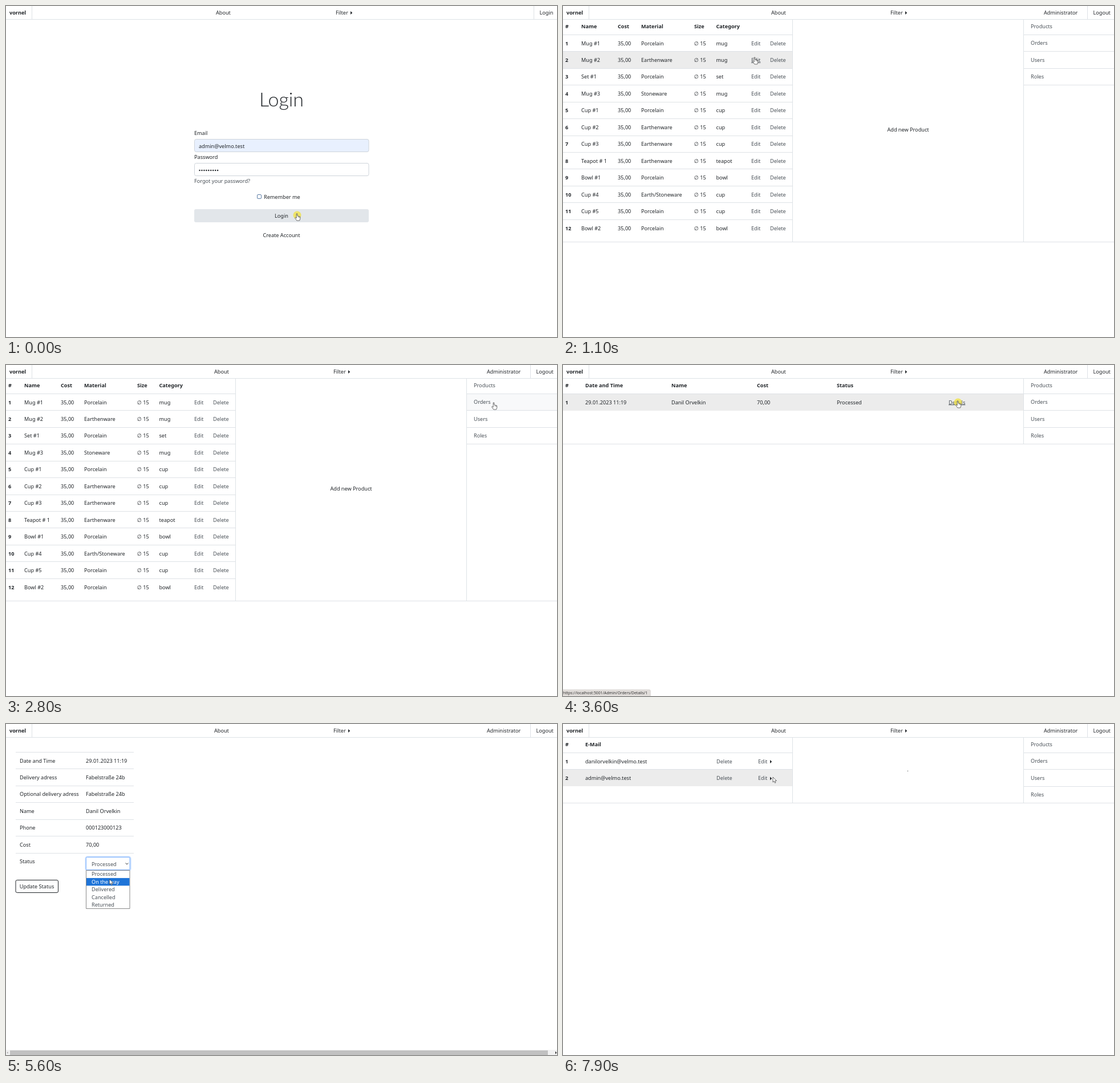
Recreate the animation shown at these times as an HTML page with a canvas. Size 966x580 px, loop 8000 ms.

```html
<!DOCTYPE html>
<html lang="en">
<head>
<meta charset="utf-8">
<title>Ceramics shop admin</title>
<style>
  html, body { margin: 0; width: 100%; height: 100%; overflow: hidden; background: #fff; }
  canvas { display: block; }
</style>
</head>
<body>
<canvas id="stage" width="966" height="580"></canvas>
<script>
const c = document.getElementById('stage').getContext('2d');
const LOOP = 8000, TICK = 100, ROW = 29.45;
const INK = '#212529', LINE = '#dee2e6', SOFT = '#495057';
const ORDERED = '29.01.2023 11:19', BUYER = 'Danil Orvelkin', STREET = 'Fabelstraße 24b';

// time, x, y, pointer kind
const POINTER = [
  [0, 510, 364, 'hand'], [99, 510, 364, 'hand'], [100, 872, 15, 'arrow'], [200, 872, 15, 'arrow'],
  [400, 863, 12, 'arrow'], [500, 863, 12, 'arrow'], [600, 600, 45, 'arrow'], [700, 342, 62, 'hand'],
  [1000, 342, 62, 'hand'], [1100, 336, 90, 'hand'], [1300, 372, 94, 'hand'], [1500, 374, 122, 'hand'],
  [1600, 374, 122, 'hand'], [2000, 600, 160, 'arrow'], [2300, 780, 60, 'arrow'], [2500, 846, 34, 'hand'],
  [2800, 855, 66, 'hand'], [3100, 855, 66, 'arrow'], [3400, 692, 63, 'hand'], [4100, 692, 63, 'arrow'],
  [4400, 201, 154, 'beam'], [4600, 201, 154, 'beam'], [4900, 190, 243, 'arrow'], [5200, 188, 246, 'arrow'],
  [5500, 182, 262, 'arrow'], [5800, 180, 292, 'arrow'], [6000, 178, 274, 'arrow'], [6300, 178, 274, 'arrow'],
  [6600, 67, 293, 'hand'], [6800, 62, 287, 'hand'], [6900, 62, 287, 'arrow'], [7200, 836, 76, 'hand'],
  [7300, 840, 88, 'hand'], [7400, 840, 92, 'hand'], [7600, 840, 92, 'arrow'], [7900, 368, 93, 'arrow']
];
const PAGES = [[0, loginPage], [100, shopPage], [600, productsPage], [3100, ordersPage],
               [3700, detailsPage], [6900, ordersPage], [7600, usersPage]];
const LINKS = [[100, 600, 'Home/Products'], [1200, 1700, 'Products/Edit/2'], [2900, 3200, 'Home/Orders'],
               [3500, 4200, 'Orders/Details/1'], [7300, 7700, 'Home/Users']];
const CLICKS = [0, 3000, 3600, 5000, 6800];

let now = 0, pointer;

function text(s, x, y, { size = 9.15, weight = 400, align = 'left', color = INK, font = 'Noto Sans' } = {}) {
  c.font = `${weight} ${size}px "${font}", "Open Sans", "DejaVu Sans", sans-serif`;
  c.textAlign = align;
  c.fillStyle = color;
  c.fillText(s, x, y + size * 0.36);
}
const bold = (s, x, y) => text(s, x, y, { weight: 700 });
const centered = (s, x, y) => text(s, x, y, { align: 'center' });

function rect(x, y, w, h, color) {
  c.fillStyle = color;
  c.fillRect(x, y, w, h);
}
const across = (x0, x1, y) => rect(x0, Math.round(y), x1 - x0, 1, LINE);
const down = (x, y0, y1) => rect(x, y0, 1, y1 - y0, LINE);

function box(x, y, w, h, fill, stroke, radius = 3, width = 1) {
  c.beginPath();
  c.roundRect(x, y, w, h, radius);
  if (fill) { c.fillStyle = fill; c.fill(); }
  if (stroke) { c.strokeStyle = stroke; c.lineWidth = width; c.stroke(); }
}

function shape(points, fill, stroke, width = 0.8) {
  c.beginPath();
  points.forEach(([x, y]) => c.lineTo(x, y));
  c.closePath();
  if (fill) { c.fillStyle = fill; c.fill(); }
  if (stroke) { c.strokeStyle = stroke; c.lineWidth = width; c.stroke(); }
}
const caret = (x, y) => shape([[x, y - 3], [x + 3.2, y], [x, y + 3]], INK);

function header(about, filter, divider, right = 966, admin = 0, last = 'Logout') {
  across(0, right, 23);
  down(45, 0, 23);
  down(divider, 0, 23);
  bold('vornel', 6, 11.5);
  text('About', about, 11.5);
  text('Filter', filter, 11.5);
  caret(filter + 26, 12);
  if (admin) text('Administrator', admin, 11.5, { color: now >= 400 && now < 600 ? SOFT : INK });
  text(last, divider + 10.5, 11.5);
}
const adminHeader = () => header(365, 574, 919, 966, 843);

function loginPage() {
  header(368, 578, 925, 966, 0, 'Login');
  text('Login', 483, 164, { size: 34, weight: 300, align: 'center', font: 'Lato' });
  text('Email', 330, 223);
  box(330.5, 233.5, 305.5, 22, '#e8f0fe', '#ced4da');
  text('admin@velmo.test', 338, 245.5);
  text('Password', 330, 264.5);
  box(330.5, 275.5, 305.5, 22, '#fff', '#ced4da');
  for (let i = 0; i < 9; i++) box(338.3 + i * 3.95, 286.8, 2.4, 2.4, INK, null, 1.2);
  text('Forgot your password?', 330, 306.5, { color: SOFT });
  box(440.5, 330.5, 7, 7, '#fff', '#5d7ea8', 1.5);
  text('Remember me', 452, 335);
  box(330, 356, 306, 23, '#e2e6ea');
  centered('Login', 483, 368);
  centered('Create Account', 483, 401.5);
}

function sideways(x0, x1, tones) {
  const gradient = c.createLinearGradient(x0, 0, x1, 0);
  tones.forEach((tone, i) => gradient.addColorStop(i / (tones.length - 1), tone));
  return gradient;
}

function oval(x, y, rx, ry, fill) {
  c.beginPath();
  c.ellipse(x, y, rx, ry, 0, 0, 7);
  c.fillStyle = fill;
  c.fill();
}

const cubic = (a, b, d, e, t) =>
  a * (1 - t) ** 3 + 3 * b * t * (1 - t) ** 2 + 3 * d * t * t * (1 - t) + e * t ** 3;

// Pottery: rim [left, right, y, depth], foot [left, right, y], tones across the wall, round = foot corner
function pot({ rim: [l, r, y, d], foot: [fl, fr, fy], tones, inside, lip, speck, count, handle, bands = [], round = 14, seed }) {
  const mid = (l + r) / 2, half = (r - l) / 2;
  const random = () => (seed = (seed * 16807) % 2147483647) / 2147483647;
  const speckle = (x, sy) => {
    c.globalAlpha = 0.35 + random() * 0.6;
    oval(x, sy, 0.4 + random() ** 4 * 1.5, 0.4 + random() ** 4 * 1.5, speck);
    c.globalAlpha = 1;
  };
  if (handle) {
    const [x0, y0, ax, ay, bx, by, x1, y1, width] = handle;
    c.beginPath();
    c.moveTo(x0, y0);
    c.bezierCurveTo(ax, ay, bx, by, x1, y1);
    c.strokeStyle = tones[2];
    c.lineWidth = width;
    c.stroke();
    for (let i = 0; i < count / 8; i++) {
      const t = random(), spread = (random() - 0.5) * width * 0.8;
      speckle(cubic(x0, ax, bx, x1, t) + spread, cubic(y0, ay, by, y1, t) + spread * 0.3);
    }
  }
  c.save();
  c.beginPath();
  c.moveTo(l, y);
  c.lineTo(fl, fy - round);
  c.quadraticCurveTo(fl + 2, fy - 4, fl + round * 1.3, fy - 3);
  c.quadraticCurveTo(mid, fy + 3, fr - round * 1.3, fy - 3);
  c.quadraticCurveTo(fr - 2, fy - 4, fr, fy - round);
  c.lineTo(r, y);
  c.ellipse(mid, y, half, d, 0, 0, Math.PI, true);
  c.fillStyle = sideways(l, r, tones);
  c.fill();
  c.clip();
  const shade = c.createLinearGradient(0, fy - 16, 0, fy);
  shade.addColorStop(0, 'rgba(60,40,25,0)');
  shade.addColorStop(1, 'rgba(60,40,25,.22)');
  rect(l, fy - 16, r - l, 18, shade);
  for (const [color, top, height] of bands) {
    c.beginPath();
    c.ellipse(mid, y + top, half + height, d, 0, Math.PI, 0, true);
    c.strokeStyle = color;
    c.lineWidth = height;
    c.stroke();
  }
  for (let i = 0; i < count; i++) speckle(l + random() * (r - l), y + random() * (fy - y));
  c.restore();
  oval(mid, y, half, d, lip);
  oval(mid, y - 0.3, half - 3, d - 2, sideways(l, r, inside));
}

const WHITE = { tones: ['#dcdadb', '#e8e7e9', '#e2e1e3', '#d3d0d0'], inside: ['#d8d3d0', '#ebe9e8', '#e6e4e3'], lip: '#dcd8d5', speck: '#94683c' };
const TAN = { tones: ['#b2947b', '#c8ab90', '#bea187', '#a1846b'], inside: ['#8d6f57', '#a98b71', '#c2a68c'], lip: '#c0a288', speck: '#5b4636' };
const SAND = { tones: ['#b69471', '#dcbd98', '#d2b28c', '#b08f6c'], inside: ['#9c7c5f', '#c9ab8c', '#d8bea0'], lip: '#8d735b', speck: '#5b432d' };
const DARK = { tones: ['#4b4444', '#585151', '#514a4a', '#3f3a3b'], inside: ['#4c4a4b', '#43536a', '#8a7868'], lip: '#9c8370', speck: '#7d7573' };

function pottery() {
  pot({ ...WHITE, rim: [58, 260, 60, 10], foot: [70, 250, 262], count: 1100, round: 16, seed: 1103 });
  pot({ ...DARK, rim: [393, 568, 88, 10], foot: [406, 557, 243], count: 260, round: 27, seed: 2111,
        bands: [['#947d6b', 1, 5], ['#1d466f', 7, 8]] });
  oval(796, 208, 113, 23, '#cfcbc9');
  oval(796, 201, 114, 20, '#e3e0de');
  oval(796, 199, 104, 15, '#dad6d3');
  oval(796, 206, 35, 4, '#a08570');
  pot({ ...WHITE, speck: '#87807c', rim: [726, 862, 97, 6], foot: [759, 831, 208], count: 220, round: 10, seed: 3121,
        handle: [854, 115, 905, 104, 906, 152, 834, 168, 8] });
  pot({ ...TAN, rim: [40, 234, 350, 10], foot: [47, 224, 506], count: 1100, seed: 4127,
        handle: [229, 363, 306, 351, 300, 428, 225, 461, 14], bands: [['rgba(120,90,66,.15)', 25, 50]] });
  pot({ ...WHITE, rim: [421, 596, 338, 10], foot: [432, 586, 508], count: 900, seed: 5153,
        handle: [424, 354, 348, 340, 340, 408, 432, 470, 14] });
  pot({ ...SAND, rim: [689, 900, 343, 11], foot: [722, 869, 517], count: 1200, seed: 6163,
        bands: [['rgba(125,92,62,.36)', 26, 56]] });
}

function heart(x, y) {
  c.beginPath();
  c.moveTo(x, y + 3.6);
  c.bezierCurveTo(x - 7.5, y - 1.8, x - 2.5, y - 5.2, x, y - 2);
  c.bezierCurveTo(x + 2.5, y - 5.2, x + 7.5, y - 1.8, x, y + 3.6);
  c.strokeStyle = INK;
  c.lineWidth = 1;
  c.stroke();
}

function shopPage() {
  header(361, 568, 909, 959, 833);
  pottery();
  ['Mug #1', 'Mug #2', 'Set #1', 'Mug #3', 'Cup #1', 'Cup #2', 'Cup #3', 'Teapot # 1', 'Bowl #1'].forEach((name, i) => {
    const column = i % 3, y = 40.5 + Math.floor(i / 3) * 263;
    text(name, 9 + column * 320.7, y);
    text('€ 35,00', 9 + column * 320.7, y + 14.5);
    heart(301 + column * 320.7, y);
  });
  across(0, 959, 283);
  across(0, 959, 546);
  [317, 637, 958].forEach(x => down(x, 23, 580));
  rect(959, 0, 7, 580, '#f1f1f1');
  rect(960, 9, 6, 283, '#c1c1c1');
  shape([[961, 6], [963, 3], [965, 6]], '#a3a3a3');
  shape([[961, 574], [963, 577], [965, 574]], '#505050');
}

function sidebar(bottom) {
  ['Products', 'Orders', 'Users', 'Roles'].forEach((label, i) => {
    const y = 35.5 + i * ROW, over = pointer.x > 808 && pointer.y > 23 && Math.abs(pointer.y - y) < ROW / 2;
    if (over) rect(808, y - 14, 158, ROW, '#f8f9fa');
    text(label, 820, y, { color: SOFT });
    across(808, 966, y + 14.2);
  });
  down(807, 23, bottom);
  across(0, 966, bottom);
}

function table(columns, heads, rows, right) {
  heads.forEach((head, i) => bold(head, columns[i], 35.5));
  across(0, right, 50);
  rows.forEach((cells, r) => {
    const y = 65.3 + r * ROW;
    const over = pointer.x < right && Math.abs(pointer.y - y) < ROW / 2;
    if (over) rect(0, Math.round(y - 14.5), right, 29, '#ececec');
    cells.forEach((cell, i) => {
      if (i === 0) return bold(cell, columns[i], y);
      const link = /^(Edit|Delete|Details)$/.test(cell);
      text(cell, columns[i], y, { color: link ? SOFT : INK });
      if (link && over && Math.abs(pointer.x - columns[i] - 10) < 13) rect(columns[i], y + 4, c.measureText(cell).width, 1, SOFT);
    });
    if (r < rows.length - 1) across(0, right, y + 14);
  });
}

function productsPage() {
  adminHeader();
  const P = 'Porcelain', E = 'Earthenware';
  const items = [['Mug #1', P], ['Mug #2', E], ['Set #1', P], ['Mug #3', 'Stoneware'], ['Cup #1', P], ['Cup #2', E], ['Cup #3', E],
                 ['Teapot # 1', E], ['Bowl #1', P], ['Cup #4', 'Earth/Stoneware'], ['Cup #5', P], ['Bowl #2', P]];
  table([4, 32, 96, 137, 230, 268.5, 330, 363], ['#', 'Name', 'Cost', 'Material', 'Size', 'Category'],
    items.map(([name, material], i) =>
      [i + 1, name, '35,00', material, '∅ 15', name.split(' ')[0].toLowerCase(), 'Edit', 'Delete']), 402);
  down(402, 23, 413);
  centered('Add new Product', 605, 217);
  sidebar(413);
}

function ordersPage() {
  adminHeader();
  const status = now > 6000 ? 'On the way' : 'Processed';
  table([4, 39, 190, 340, 480, 676], ['#', 'Date and Time', 'Name', 'Cost', 'Status'],
    [[1, ORDERED, BUYER, '70,00', status, 'Details']], 807);
  sidebar(138);
}

function usersPage() {
  adminHeader();
  table([4, 39, 269, 342], ['#', 'E-Mail'],
    [[1, 'danilorvelkin@velmo.test', 'Delete', 'Edit'], [2, 'admin@velmo.test', 'Delete', 'Edit']], 402);
  caret(363, 66);
  caret(363, 95.5);
  down(402, 23, 138);
  centered('.', 604.5, 79.5);
  sidebar(138);
}

function detailsPage() {
  adminHeader();
  const fields = [['Date and Time', ORDERED], ['Delivery adress', STREET], ['Optional delivery adress', STREET],
                  ['Name', BUYER], ['Phone', '000123000123'], ['Cost', '70,00'], ['Status', '']];
  fields.forEach(([label, value], i) => {
    const y = 64.3 + i * ROW;
    across(17, 224, y - 15.5);
    text(label, 24, y);
    text(value, 140, y);
  });
  const chosen = now >= 6200, focused = now >= 5000, open = focused && !chosen;
  if (focused) box(140, 233, 78, 23.5, null, '#c2dbfe', 3, 3);
  box(140.5, 233.5, 76.5, 22, '#fff', focused ? '#86b7fe' : '#ced4da', 2);
  text(chosen ? 'On the way' : 'Processed', 150, 245.5, { color: SOFT });
  c.beginPath();
  [[209.7, 243.5], [212, 246], [214.3, 243.5]].forEach(([x, y]) => c.lineTo(x, y));
  c.strokeStyle = '#343a40';
  c.lineWidth = 1;
  c.stroke();
  box(17, 273.5, 74.5, 22, '#fff', INK, 2.5);
  centered('Update Status', 54, 285);
  rect(0, 571, 966, 9, '#f1f1f1');
  rect(7, 572, 943, 8, '#c1c1c1');
  shape([[3.5, 574], [1.5, 576], [3.5, 578]], '#a3a3a3');
  shape([[963, 573.5], [965.5, 576], [963, 578.5]], '#303030');
  if (open) {
    box(140.5, 256.5, 76.5, 67, '#fff', '#8a8a8a', 0);
    const hovered = Math.max(0, Math.floor((pointer.y - 256.5) / 13.4));
    ['Processed', 'On the way', 'Delivered', 'Cancelled', 'Returned'].forEach((option, i) => {
      const y = 256.5 + i * 13.4;
      if (i === hovered) rect(141, y, 75.5, 13.4, '#1e74d8');
      text(option, 150, y + 6.7, { color: i === hovered ? '#fff' : SOFT });
    });
  }
}

function linkStatus() {
  const link = LINKS.find(([from, to]) => now >= from && now < to);
  if (!link) return;
  const url = 'https://localhost:5001/Admin/' + link[2];
  const look = { size: 6.8, color: '#333' };
  text(url, 0, 575, look);
  box(-3, 569, c.measureText(url).width + 8, 14, '#e2dedb', '#cfcbc8', 2, 0.7);
  text(url, 0, 575, look);
}

function locatePointer() {
  const i = POINTER.findLastIndex(key => key[0] <= now);
  const [t0, x0, y0, kind] = POINTER[i], [t1, x1, y1] = POINTER[i + 1] || [LOOP, x0, y0];
  const k = (now - t0) / (t1 - t0);
  return { x: x0 + (x1 - x0) * k, y: y0 + (y1 - y0) * k, kind };
}

function drawPointer({ x, y, kind }) {
  if (CLICKS.includes(now)) box(x - 6.5, y - 4.5, 14, 14, 'rgba(240,226,70,.78)', null, 7);
  c.save();
  c.translate(x, y);
  if (kind === 'arrow') {
    shape([[0, 0], [0, 9], [2, 7.2], [3.6, 10.3], [5, 9.6], [3.6, 6.7], [6.4, 6.4]], '#fff', '#333', 0.7);
  } else if (kind === 'hand') {
    shape([[-0.8, 0], [0.8, 0], [1, 4], [5.6, 5.2], [5.8, 8.5], [4.6, 12], [-0.2, 12], [-3.4, 7.5], [-2.6, 6.4], [-0.8, 8]], '#fff', '#333', 0.7);
    [2.4, 4].forEach(px => rect(px, 4.8, 0.6, 2.4, '#555'));
  } else {
    rect(-0.5, -4.5, 1, 9, '#222');
    rect(-2.5, -5, 5, 1, '#222');
    rect(-2.5, 4, 5, 1, '#222');
  }
  c.restore();
}

function draw() {
  pointer = locatePointer();
  rect(0, 0, 966, 580, '#fff');
  PAGES.findLast(([start]) => start <= now)[1]();
  linkStatus();
  drawPointer(pointer);
}

const start = performance.now();
let shown = -1;
function frame() {
  now = Math.floor(((performance.now() - start) % LOOP) / TICK) * TICK;
  if (now !== shown) {
    shown = now;
    draw();
  }
  requestAnimationFrame(frame);
}
frame();
</script>
</body>
</html>
```
